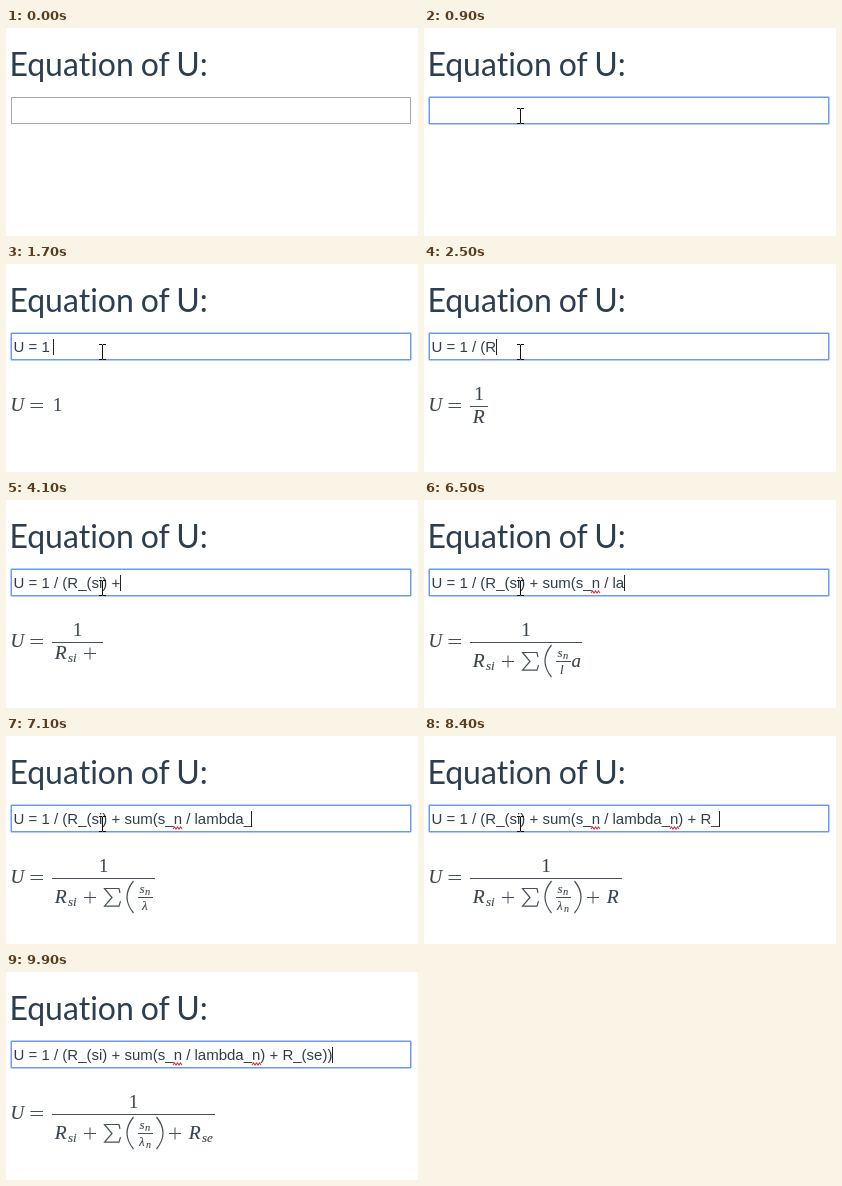
Recreate the animation shown at these times as an HTML page. Size 412 px wide and 208 px high, loop 10 s.

```html
<!DOCTYPE html>
<html lang="en">
<head>
<meta charset="utf-8">
<title>Equation typing</title>
<style>
  html, body { margin: 0; width: 100%; height: 100%; overflow: hidden; background: #fff; }
  svg { display: block; width: 412px; height: 208px; }
  text { white-space: pre; }
  .title { font: 400 32px Lato, sans-serif; fill: #2c3e50; font-variant-ligatures: none; word-spacing: -1.2px; }
  .typed { font: 15px "Liberation Sans", Arial, sans-serif; fill: #2f3d4a; }
  .math text { font-family: "Liberation Serif", "Times New Roman", serif; fill: #3a4450; stroke: #3a4450; stroke-width: .1; }
  .math path { fill: none; stroke: #46505a; }
</style>
</head>
<body>
<svg viewBox="0 0 412 208">
  <rect width="412" height="208" fill="#fff"/>
  <text class="title" x="3.4" y="48">Equation of U:</text>
  <rect id="box" fill="#fff"/>
  <text id="typed" class="typed" x="7.6" y="88"></text>
  <path id="squiggles" fill="none" stroke="#dc2f3a" stroke-width="1.1"/>
  <rect id="caret" y="75" width="1" height="16" fill="#222"/>
  <g id="math" class="math"></g>
  <g id="pointer">
    <path id="beam" d="M-3.5-7.5h3l.5.5l.5-.5h3M0-7V7M-3.5 7.5h3l.5-.5l.5.5h3" fill="none" stroke="#111"/>
    <path id="arrow" d="M0 0V16L3.7 12.5L6.2 18.2L8.7 17.1L6.2 11.6H11.3Z" fill="#fff" stroke="#111"/>
  </g>
</svg>
<script>
const $ = id => document.getElementById(id);
const LOOP = 10000, FRAME = 100;
const FULL = "U = 1 / (R_(si) + sum(s_n / lambda_n) + R_(se))";

// Keystroke times in tenths of a second, one per character.
const KEYS = [
  10, 11, 12, 13, 15, 17, 19, 21, 21, 25, 27, 29, 32, 35, 37, 38,
  41, 42, 44, 46, 47, 49, 53, 55, 57, 59, 62, 63, 64, 65, 66, 68, 69, 70, 71,
  73, 75, 76, 78, 79, 82, 84, 85, 87, 88, 90, 91
];

// Denominator tokens, each valid from a given character count.
const DENOMINATORS = [
  [7, ""], [10, "R"], [13, "R _s"], [14, "R _si"], [17, "R _si +"],
  [19, "R _si + s"], [20, "R _si + s u"], [21, "R _si + Σ"],
  [22, "R _si + Σ ("], [23, "R _si + Σ ( s"], [25, "R _si + Σ ( s _n"],
  [27, "R _si + Σ [ /"], [29, "R _si + Σ [ /l"], [30, "R _si + Σ [ /l a"],
  [31, "R _si + Σ [ /l a m"], [32, "R _si + Σ [ /l a m b"],
  [33, "R _si + Σ [ /l a m b d"], [34, "R _si + Σ [ /λ"],
  [36, "R _si + Σ [ /λn"], [37, "R _si + Σ [ /λn ]"],
  [39, "R _si + Σ [ /λn ] +"], [41, "R _si + Σ [ /λn ] + R"],
  [44, "R _si + Σ [ /λn ] + R _s"], [45, "R _si + Σ [ /λn ] + R _se"]
];

const glyph = (s, x, y, size, style = "italic") =>
  `<text x="${x}" y="${y}" font-size="${size}" font-style="${style}">${s}</text>`;
const line = (d, w = 1) => `<path d="${d}" stroke-width="${w}"/>`;
const plus = (x, y) => line(`M${x} ${y - 5.5}h12m-6-6v12`);

function token(tok, x, y) {
  const rest = tok.slice(1);
  switch (tok[0]) {
    case "R": return [14, glyph("R", x + .8, y, 19.5)];
    case "_": return [rest.length * 5 + 1, glyph(rest, x, y + 2.5, 13)];
    case "+": return [24, plus(x + 5, y)];
    case "Σ": return [21, line(`M${x + 17} ${y - 10}l-1-4.5H${x + 1.5}l7.5 9l-7.5 8.7h14.5l1.5-5`, 1.2)];
    case "(": return [8, glyph("(", x + 1, y, 19, "normal")];
    case "[": return [14, line(`M${x + 9.5} ${y - 22}q-13 16 0 32`, 1.2)];
    case "]": return [11, line(`M${x + 3.5} ${y - 22}q13 16 0 32`, 1.2)];
    case "/": {
      const lower = rest[0] || "", sub = rest[1] || "";
      return [15, glyph("s", x + 1.5, y - 10, 13) + glyph("n", x + 7, y - 8, 10.5) +
        line(`M${x} ${y - 5.5}h15`) + glyph(lower, x + (sub ? 1 : 4), y + 7, 13) +
        glyph(sub, x + 8, y + 9, 10)];
    }
    default: return [tok === "m" ? 14 : 9, glyph(tok, x + .5, y, 19)];
  }
}

function formula(n) {
  if (!n) return "";
  let out = glyph("U", 4.5, 147, 19);
  if (n >= 3) out += line("M24.5 139.5h12.5m-12.5 4h12.5");
  if (n < 5) return out;
  if (n < 7) return out + glyph("1", 47, 147, 18.5, "normal");

  const den = DENOMINATORS.filter(d => d[0] <= n).pop()[1];
  const y = den.includes("[") ? 167 : den.includes("Σ") ? 160 : 159;
  let x = 48;
  for (const tok of den.split(" ").filter(Boolean)) {
    const [advance, mark] = token(tok, x, y);
    out += mark;
    x += advance;
  }
  const end = den ? x + (den.endsWith("+") ? 0 : 2) : 62;
  const mid = (46 + end) / 2;
  return out + line(`M46 142.5H${end}`) + glyph("1", mid - 4.6, 136, 18.5, "normal");
}

const squiggle = x => `M${x} 93` + "l1.5-2l1.5 2".repeat(3);

// Pointer path: time, x, y.
const PATH = [
  [100, 232, 175], [200, 150, 120], [300, 104, 42], [400, 96.5, 88],
  [9400, 96.5, 88], [9500, 128, 98], [9600, 200, 128], [9700, 290, 162], [9800, 364, 188]
];

function pointerAt(t) {
  if (t < PATH[0][0] || t > 9800) return null;
  const i = Math.max(1, PATH.findIndex(p => p[0] >= t));
  const [t0, x0, y0] = PATH[i - 1], [t1, x1, y1] = PATH[i];
  const k = (t - t0) / (t1 - t0);
  return [x0 + (x1 - x0) * k, y0 + (y1 - y0) * k];
}

function setAll(el, attrs) {
  for (const name in attrs) el.setAttribute(name, attrs[name]);
}

function render(t) {
  const n = KEYS.filter(k => k * 100 <= t).length;
  const focused = t >= 500;
  setAll($("box"), focused
    ? { x: 5.25, y: 69.25, width: 399.5, height: 26.5, rx: .5, stroke: "#6f9be6", "stroke-width": 1.5 }
    : { x: 5.5, y: 69.5, width: 399, height: 26, rx: 0, stroke: "#a9a9a9", "stroke-width": 1 });

  $("typed").textContent = FULL.slice(0, n);
  const width = n ? $("typed").getComputedTextLength() : 0;
  const blinkOff = (t >= 900 && t < 1000) || (t >= 9500 && t < 9900);
  $("caret").setAttribute("x", Math.round(7 + width));
  $("caret").style.display = focused && !blinkOff ? "" : "none";
  $("squiggles").setAttribute("d", (n >= 26 ? squiggle(167) : "") + (n >= 37 ? squiggle(246) : ""));
  $("math").innerHTML = formula(n);

  const pos = pointerAt(t);
  $("pointer").style.display = pos ? "" : "none";
  if (pos) {
    const [x, y] = pos;
    const overText = y < 97 && (y > 68 || x < 202);
    $("pointer").setAttribute("transform", `translate(${x} ${y})`);
    $("beam").style.display = overText ? "" : "none";
    $("arrow").style.display = overText ? "none" : "";
  }
}

const start = performance.now();
function tick() {
  const t = (performance.now() - start) % LOOP;
  render(Math.floor(t / FRAME) * FRAME);
  requestAnimationFrame(tick);
}
render(0);
requestAnimationFrame(tick);
</script>
</body>
</html>
```
